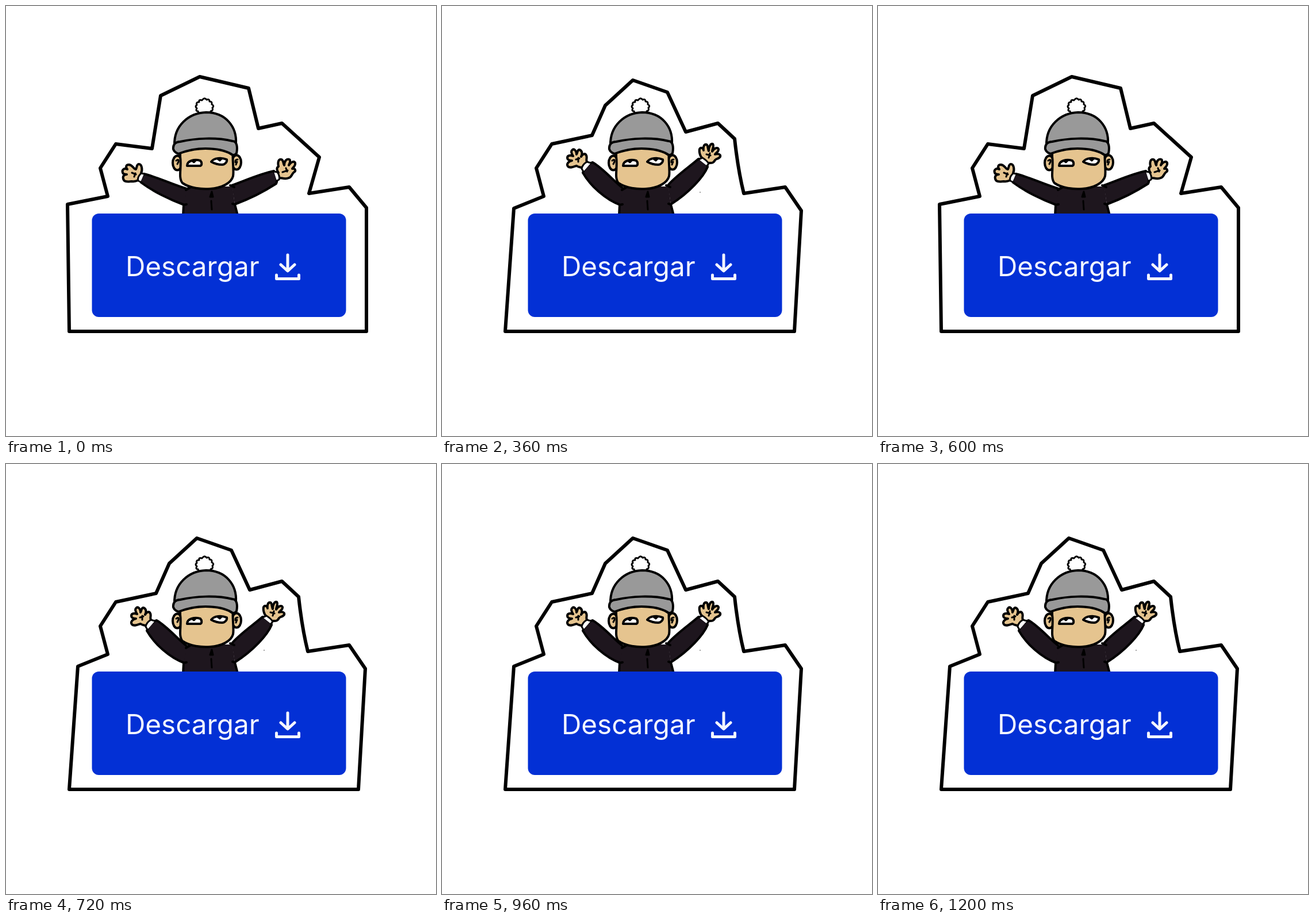
Animation, 748 px wide and 748 px high, one loop 1.32 s. Source, as an HTML page:

```html
<!DOCTYPE html>
<html lang="es">
<head>
<meta charset="utf-8">
<style>
  html, body { margin: 0; width: 100%; height: 100%; overflow: hidden; background: #fff; }
  svg { display: block; width: 100%; height: 100%; }
  .ink { stroke: #000; stroke-width: 4; stroke-linecap: round; stroke-linejoin: round; fill: none; }
  .ink .edge { stroke-width: 6; }
  .ink .fine { stroke-width: 3; }
  .ink .coat { fill: #1e161e; }
  .ink .skin { fill: #e5c48f; }
  .ink .wool { fill: #999; }
  .ink .white { fill: #fff; }
  .ink .solid { fill: #000; }
  text { font: 400 47.6px Inter, "Open Sans", sans-serif; fill: #f4f6ff; }
  .icon { fill: none; stroke: #f4f6ff; stroke-width: 5; stroke-linecap: round; stroke-linejoin: round; }
</style>
</head>
<body>
<svg viewBox="0 0 748 748">
  <!-- arms spread -->
  <g class="ink" id="spread">
    <path class="edge" d="M107 345L177 331L164 282L191 240L254 248L269 156L337 123L422 143L439 213L480 204L545 263L527 326L597 315L627 351V566H110Z"/>
    <path class="coat" d="M318 319C290 311 262 297 240 292C234 296 231 302 235 307C255 322 285 337 310 346"/>
    <path class="coat" d="M393 312C420 302 445 291 466 287C472 293 473 302 470 309C450 322 425 335 398 345"/>
    <path class="skin" d="M235 291C238 284 236 275 231 275C227 275 228 281 226 284C222 284 221 277 214 276C208 276 208 281 211 284C206 281 201 285 203 290C204 293 208 293 210 293C204 293 202 298 205 303C208 307 215 305 219 305C224 306 228 304 230 303"/>
    <path class="skin" d="M474 290C470 284 471 281 474 279C472 270 475 266 479 267C483 268 482 274 484 277C484 270 488 265 493 267C496 269 493 274 492 277C496 271 501 269 503 273C504 278 500 280 498 283C503 282 505 287 501 289C497 292 497 298 492 299C486 302 480 299 476 299"/>
    <path class="fine" d="M219 290L226 293M225 291L223 297M481 289L490 286M487 282L489 288"/>
    <path class="white fine" d="M240 292L235 291Q228 298 230 304L234 306M466 288L472 289Q477 296 475 302L471 304"/>
  </g>

  <!-- arms raised -->
  <g class="ink" id="raised">
    <path class="edge" d="M125 352L177 331L164 282L191 240L261 225L284 173L332 129L392 150L424 219L480 204L509 231Q515 286 525 326L597 315L625 356L613 566H110Z"/>
    <path class="coat" d="M316 318C300 306 280 282 262 272C254 274 247 282 245 290C258 313 285 337 310 346"/>
    <path class="coat" d="M393 312C405 297 430 280 446 266C453 265 462 274 462 280C455 297 430 325 398 345"/>
    <path class="skin" d="M252 271C250 267 253 264 251 260C249 255 244 258 242 262C245 256 243 251 239 250C235 250 236 255 234 258C234 252 230 248 227 250C223 253 226 258 228 261C223 259 218 260 218 264C218 268 223 269 226 269C220 270 216 275 219 279C223 283 230 279 234 278C238 281 240 280 243 281"/>
    <path class="skin" d="M453 265C449 262 447 254 448 249C450 245 455 247 455 251C454 245 456 240 460 241C463 242 462 248 464 252C464 245 467 239 471 240C474 243 470 249 470 253C474 246 480 246 481 249C482 253 477 255 475 258C480 256 485 258 484 262C482 266 477 265 475 268C472 274 469 273 464 273"/>
    <path class="fine" d="M233 267L239 265M237 264L237 271M460 258L467 260M466 256L464 264"/>
    <path class="white fine" d="M259 273L252 271Q244 276 243 283L246 288M447 267L453 264Q460 268 464 274L461 278"/>
    <circle cx="449" cy="324" r=".7" stroke="none" fill="#000"/>
  </g>

  <g class="ink">
    <path class="coat" stroke="none" d="M308 364L309 346L316 314H394L398 345L403 364Z"/>
    <path d="M308 364L309 346L314 345M403 364L398 345L394 344M313 320L320 316M390 312L397 315"/>
    <path class="solid fine" d="M358 323L355 332H360ZM357 339L358 354"/>
    <ellipse class="skin" cx="298" cy="273" rx="8" ry="12.500"/>
    <ellipse class="skin" cx="401" cy="272" rx="8" ry="12.500"/>
    <path class="fine" d="M296 269Q301 265 300 271L298 275M403 267Q398 267 399 272L402 271L400 276"/>
    <path class="skin" d="M303 245V262C306 280 299 299 307 308C320 317 340 319 355 318C375 317 392 308 395 296C397 285 393 270 395 245Z"/>
    <path class="white" d="M315 278C315 269 328 266 338 269C341 272 341 277 338 278Z"/>
    <path class="white" d="M357 271C362 264 375 263 384 267C385 271 381 276 376 276Q366 276 357 271Z"/>
    <path class="solid fine" d="M323 269H330L327 272ZM368 266H375L372 269Z"/>
    <path class="white fine" d="M335 187L334 183Q329 183 332 178Q328 175 332 172Q330 167 336 167Q335 162 341 164Q345 158 349 163Q354 161 354 166Q359 166 358 171Q363 174 359 177Q361 182 356 183L357 187"/>
    <path class="wool" d="M293 242C292 208 318 186 348 185C382 185 402 210 400 240Z"/>
    <path class="wool" d="M291 249C290 240 296 236 303 236C330 230 365 228 394 235C402 235 403 246 401 256Q399 260 394 259C384 252 366 248 347 248C329 248 313 252 300 257Q293 255 291 249Z"/>
  </g>

  <rect x="149.500" y="361" width="442" height="180" rx="12" fill="#0330d5"/>
  <text x="208" y="469.500">Descargar</text>
  <path class="icon" d="M490 433V460M478 450L490 461L502 450M470.500 468V474.500H509.500V468"/>
</svg>
<script>
  const STEP = 120, COUNT = 11;
  const spread = document.getElementById("spread");
  const raised = document.getElementById("raised");

  // The arms alternate, resting spread for two steps mid-loop.
  function draw(now) {
    const i = Math.floor(now / STEP) % COUNT;
    const up = i < 5 ? i % 2 === 1 : i % 2 === 0;
    raised.style.display = up ? "" : "none";
    spread.style.display = up ? "none" : "";
  }

  let start;
  function tick(now) {
    start ??= now;
    draw(now - start);
    requestAnimationFrame(tick);
  }
  draw(0);
  requestAnimationFrame(tick);
</script>
</body>
</html>
```
